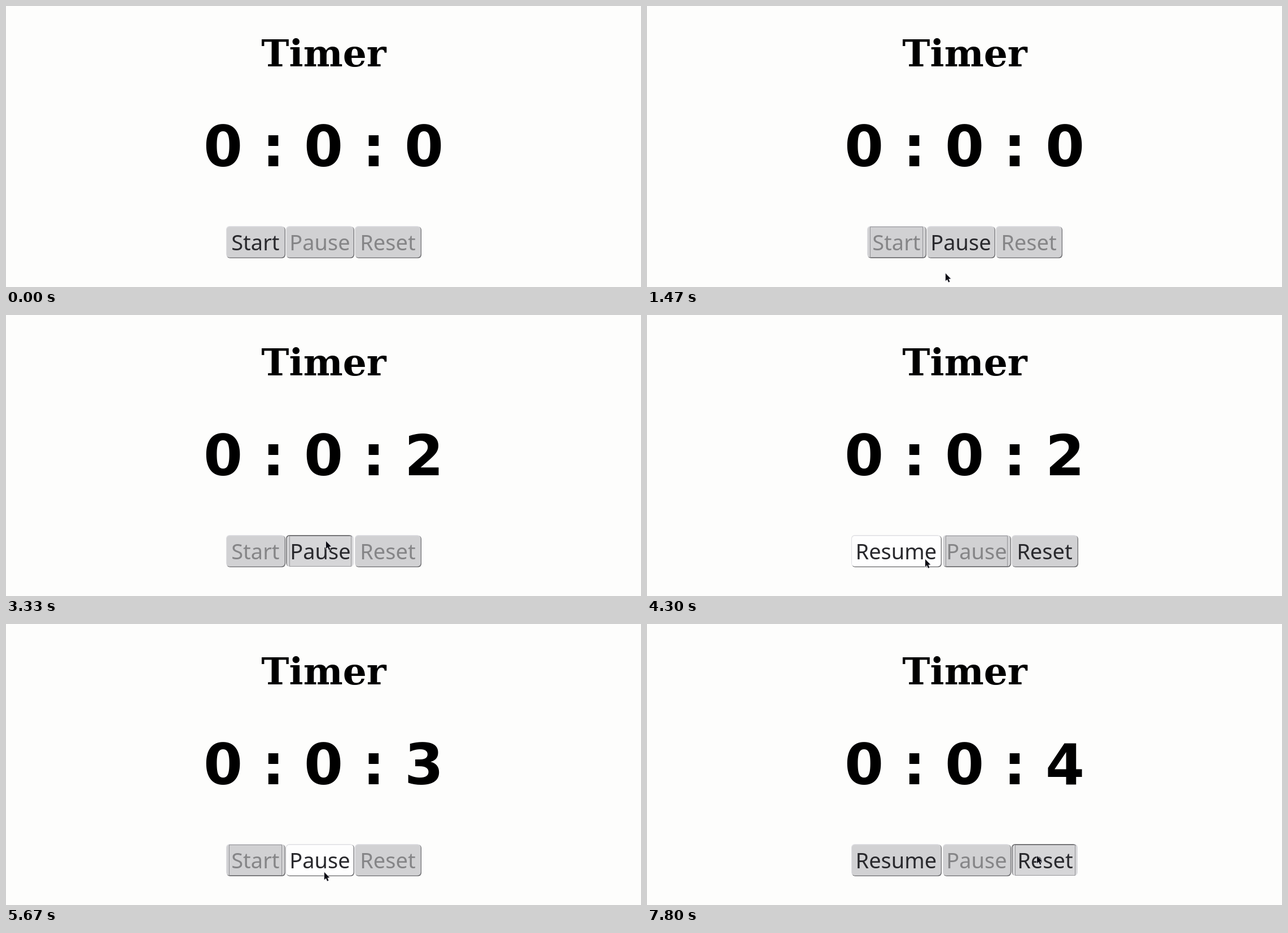
An HTML page with a canvas that plays this animation: 1125 by 498 pixels, repeating every 8000 ms.

```html
<!DOCTYPE html>
<html lang="en">
<head>
<meta charset="utf-8">
<title>Timer</title>
<style>
  html, body { margin: 0; width: 100%; height: 100%; overflow: hidden; background: #fdfdfc; }
  canvas { display: block; width: 1125px; height: 498px; }
</style>
</head>
<body>
<canvas id="stage" width="1125" height="498"></canvas>
<script>
const ctx = document.getElementById('stage').getContext('2d');
const LOOP = 8000, CENTER = 563;
const TOP = 390, HEIGHT = 57, GAP = 1.5;
const WIDTH = { Start: 105, Resume: 160, Pause: 120.5, Reset: 118 };

// Each move of the mouse glides to a point; dip bows the way downwards
const entry = { x: 1028, y: 372 };
const moves = [
  { from: 66, to: 866, x: 454, y: 424, dip: 12 },
  { from: 1060, to: 1730, x: 542, y: 457, dip: 23 },
  { from: 2430, to: 3030, x: 567, y: 401, dip: 0 },
  { from: 3470, to: 4200, x: 493, y: 433, dip: 50 },
  { from: 4690, to: 5660, x: 564, y: 440, dip: 44 },
  { from: 5970, to: 6460, x: 557, y: 428, dip: 0 },
  { from: 7030, to: 7660, x: 691, y: 411, dip: 54 }
];

// The first four clicks start and halt the clock in turn
const clicks = [
  { down: 930, up: 1030, button: 0 },
  { down: 3320, up: 3465, button: 1 },
  { down: 4560, up: 4660, button: 0 },
  { down: 6895, up: 7030, button: 1 },
  { down: 7790, up: LOOP, button: 2 }
];

function mouseAt(t) {
  if (t < moves[0].from) return null;
  let { x, y } = entry;
  for (const m of moves) {
    if (t < m.from) break;
    const k = Math.min(1, (t - m.from) / (m.to - m.from));
    const ease = 1 - (1 - k) ** 2;
    x += (m.x - x) * ease;
    y += (m.y - y) * ease + m.dip * Math.sin(Math.PI * k);
  }
  return { x: Math.round(x), y: Math.round(y) };
}

function secondsAt(t) {
  const [start, pause, resume, halt] = clicks.map(c => c.up);
  const run = (a, b) => Math.floor(Math.max(0, Math.min(t, b) - a) / 1000);
  return run(start, pause) + run(resume, halt);
}

function buttonsAt(t) {
  const done = clicks.filter(c => t >= c.up).length;
  const running = done % 2 === 1, paused = done > 0 && !running;
  const row = [
    { label: paused ? 'Resume' : 'Start', enabled: !running },
    { label: 'Pause', enabled: running },
    { label: 'Reset', enabled: paused }
  ];
  const total = row.reduce((sum, b) => sum + WIDTH[b.label] + GAP, -GAP);
  let x = CENTER - total / 2;
  for (const b of row) {
    b.x = Math.round(x);
    b.w = Math.round(WIDTH[b.label]);
    x += WIDTH[b.label] + GAP;
  }
  return row;
}

function text(str, font, x, y, color) {
  ctx.font = font;
  ctx.fillStyle = color;
  ctx.fillText(str, x, y);
}

function box(x, y, w, h, r, color) {
  ctx.beginPath();
  ctx.roundRect(x, y, w, h, r);
  ctx.fillStyle = color;
  ctx.fill();
}

function drawButton({ label, x, w, enabled }, hover, pressed, focused) {
  const dark = '#6c6c6f', light = '#dedee2';
  const face = pressed ? '#d6d6d8' : hover ? '#fefefe' : '#d1d1d3';
  const shift = pressed ? 1 : 0;
  if (pressed) {
    box(x, TOP, w - 1, HEIGHT - 1, 6, light);
    box(x, TOP, w - 3, HEIGHT - 2, 6, dark);
    box(x + 1.5, TOP + 1.5, w - 4, HEIGHT - 3, 5, face);
  } else {
    box(x + 1, TOP + 1, w - 1, HEIGHT - 1, 6, dark);
    box(x, TOP, w - 1.5, HEIGHT - 1.5, 6, light);
    box(x + 1, TOP + 1.5, w - 2.5, HEIGHT - 3, 5, face);
  }
  if (focused) {
    ctx.strokeStyle = '#555558';
    ctx.lineWidth = 1;
    ctx.setLineDash([1, 1]);
    ctx.strokeRect(x + 5.5 + shift, TOP + 1.5, w - 12, HEIGHT - 3);
    ctx.setLineDash([]);
  }
  text(label, '38px "Noto Sans", sans-serif', x + w / 2 - 0.6 + shift, 433,
    enabled ? '#29292d' : '#858587');
}

function drawMouse({ x, y }) {
  const shape = [[0, 0], [0, 13], [3, 10.5], [5.2, 15.5], [7.4, 14.5], [5.2, 9.8], [9, 9.3]];
  ctx.beginPath();
  for (const [dx, dy] of shape) ctx.lineTo(x + dx, y + dy);
  ctx.closePath();
  ctx.strokeStyle = '#d8d8dc';
  ctx.lineWidth = 1.4;
  ctx.stroke();
  ctx.fillStyle = '#0c0c14';
  ctx.fill();
}

function draw(t) {
  ctx.fillStyle = '#fdfdfc';
  ctx.fillRect(0, 0, 1125, 498);
  ctx.textAlign = 'center';
  text('Timer', 'bold 66.2px "DejaVu Serif", serif', CENTER, 106.5, '#000');
  text(`0 : 0 : ${secondsAt(t)}`, 'bold 99.3px "DejaVu Sans", sans-serif', 562.5, 283.5, '#000');

  const mouse = mouseAt(t);
  const last = clicks.filter(c => t >= c.down).pop();
  buttonsAt(t).forEach((b, i) => {
    const hover = b.enabled && mouse && mouse.x >= b.x && mouse.x < b.x + b.w &&
      mouse.y >= TOP && mouse.y < TOP + HEIGHT;
    const focused = last && last.button === i;
    drawButton(b, hover, focused && t < last.up, focused);
  });
  if (mouse) drawMouse(mouse);
}

const begin = performance.now();
function frame() {
  draw((performance.now() - begin) % LOOP);
  requestAnimationFrame(frame);
}
frame();
</script>
</body>
</html>
```
